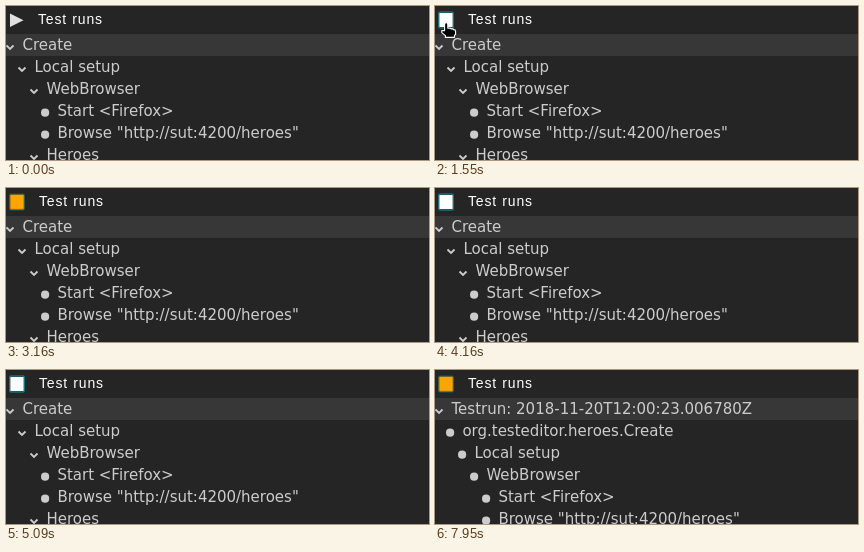
These frames come from a looping animation (423 px wide and 154 px high, 8000 ms). An HTML page:

```html
<!DOCTYPE html>
<html lang="en">
<head>
<meta charset="utf-8">
<title>Test runs</title>
<style>
html, body { margin: 0; width: 100%; height: 100%; overflow: hidden; background: #252526; }
svg { display: block; width: 423px; height: 154px; }
text { font: 15px "DejaVu Sans", sans-serif; fill: #ccc; white-space: pre; }
.title { font: 14px "Liberation Sans", Arial, sans-serif; letter-spacing: .8px; word-spacing: .8px; fill: #fff; }
.chevron { fill: none; stroke: #ccc; stroke-width: 1.8; }
.bullet { fill: #ccc; }
.play { fill: #e0e0e0; }
.focus { fill: none; stroke-width: 1.6; }
.hand { fill: #000; stroke: #fff; stroke-width: 1.1; stroke-linejoin: round; }

.title, .play, .focus, .stop, .before, .after, .hand { animation: 8s linear infinite; }
.title { animation-name: nudge; animation-timing-function: step-end; }
.play { animation-name: until-run; animation-timing-function: step-end; }
.focus { animation-name: from-click, ring; animation-timing-function: step-end, ease-in-out; }
.stop { animation-name: from-run, pulse; animation-timing-function: step-end, ease-in-out;
  transform-origin: 11px 14px; }
.before { animation-name: until-result; animation-timing-function: step-end; }
.after { animation-name: from-result; animation-timing-function: step-end; }
.hand { animation-name: pointer; }

@keyframes nudge { 0% { transform: none; } 16.75%, 100% { transform: translateX(1px); } }
@keyframes until-run { 0% { opacity: 1; } 16.75%, 100% { opacity: 0; } }
@keyframes from-run { 0% { opacity: 0; } 16.75%, 100% { opacity: 1; } }
@keyframes from-click { 0% { opacity: 0; } 14.75%, 100% { opacity: 1; } }
@keyframes until-result { 0% { opacity: 1; } 80%, 100% { opacity: 0; } }
@keyframes from-result { 0% { opacity: 0; } 80%, 100% { opacity: 1; } }
@keyframes pulse {
  0%, 34.375%, 46%, 52%, 63.625%, 94.75% { fill: #fff; transform: scale(1); }
  39.25%, 39.75%, 56.875%, 57.375%, 99.375%, 100% { fill: #ffa500; transform: scale(1.05); }
}
@keyframes ring {
  0%, 34.375%, 46%, 52%, 63.625%, 94.75% { stroke: #13727c; }
  39.25%, 39.75%, 56.875%, 57.375%, 99.375%, 100% { stroke: #0f4c54; }
}
@keyframes pointer {
  0%, 7.8% { transform: translate(12px, -24px); }
  7.875% { transform: translate(11px, -13px); animation-timing-function: ease-out; }
  11.25%, 19.5% { transform: translate(6px, 16px); }
  20.375% { transform: translate(2px, 32px); }
  21.375% { transform: translate(62px, 62px); }
  22.875% { transform: translate(205px, 120px); }
  23.875%, 100% { transform: translate(262px, 160px); }
}
</style>
</head>
<body>
<svg viewBox="0 0 423 154">
  <rect width="423" height="154" fill="#252526"/>
  <rect y="28" width="423" height="22" fill="#373737"/>
  <path class="play" d="M4 7.5L17.5 14.2L4 21Z"/>
  <rect class="focus" x="3.8" y="6" width="14.4" height="16" rx="1.2"/>
  <rect class="stop" x="4.4" y="7" width="13.2" height="14" rx=".6"/>
  <text class="title" x="32" y="18">Test runs</text>
  <g class="before" id="before"></g>
  <g class="after" id="after"></g>
  <path class="hand" d="M3.6 8.6V2.4Q3.6.8 5.2.8T6.8 2.4V6.2H9.4L10 6.9H12L12.6 7.6Q14.6 7.6 14.6 9.4V12.2L13.4 13.6V15.4H4.4V13.6L.8 10.6V8.6Z"/>
</svg>
<script>
const NS = "http://www.w3.org/2000/svg";

function add(parent, tag, attrs, label = "") {
  const el = document.createElementNS(NS, tag);
  for (const key in attrs) el.setAttribute(key, attrs[key]);
  el.textContent = label;
  parent.append(el);
}

// Each row: [label x, label, is open]
function drawTree(id, rows) {
  const group = document.getElementById(id);
  rows.forEach(([x, label, open], i) => {
    const top = 28 + 22 * i;
    if (open) add(group, "path", { class: "chevron", d: `M${x - 16.5} ${top + 11.5}l3.5 3.5l3.5 -3.5` });
    else add(group, "circle", { class: "bullet", cx: x - 11.9, cy: top + 12.7, r: 4.1 });
    add(group, "text", { x: open ? x - 0.5 : x + 0.4, y: top + 16 }, label);
  });
}

drawTree("before", [
  [17, "Create", true],
  [29, "Local setup", true],
  [41, "WebBrowser", true],
  [51, "Start <Firefox>"],
  [51, 'Browse "http://sut:4200/heroes"'],
  [41, "Heroes", true]
]);
drawTree("after", [
  [17, "Testrun: 2018-11-20T12:00:23.006780Z", true],
  [27, "org.testeditor.heroes.Create"],
  [39, "Local setup"],
  [51, "WebBrowser"],
  [63, "Start <Firefox>"],
  [63, 'Browse "http://sut:4200/heroes"']
]);
</script>
</body>
</html>
```
